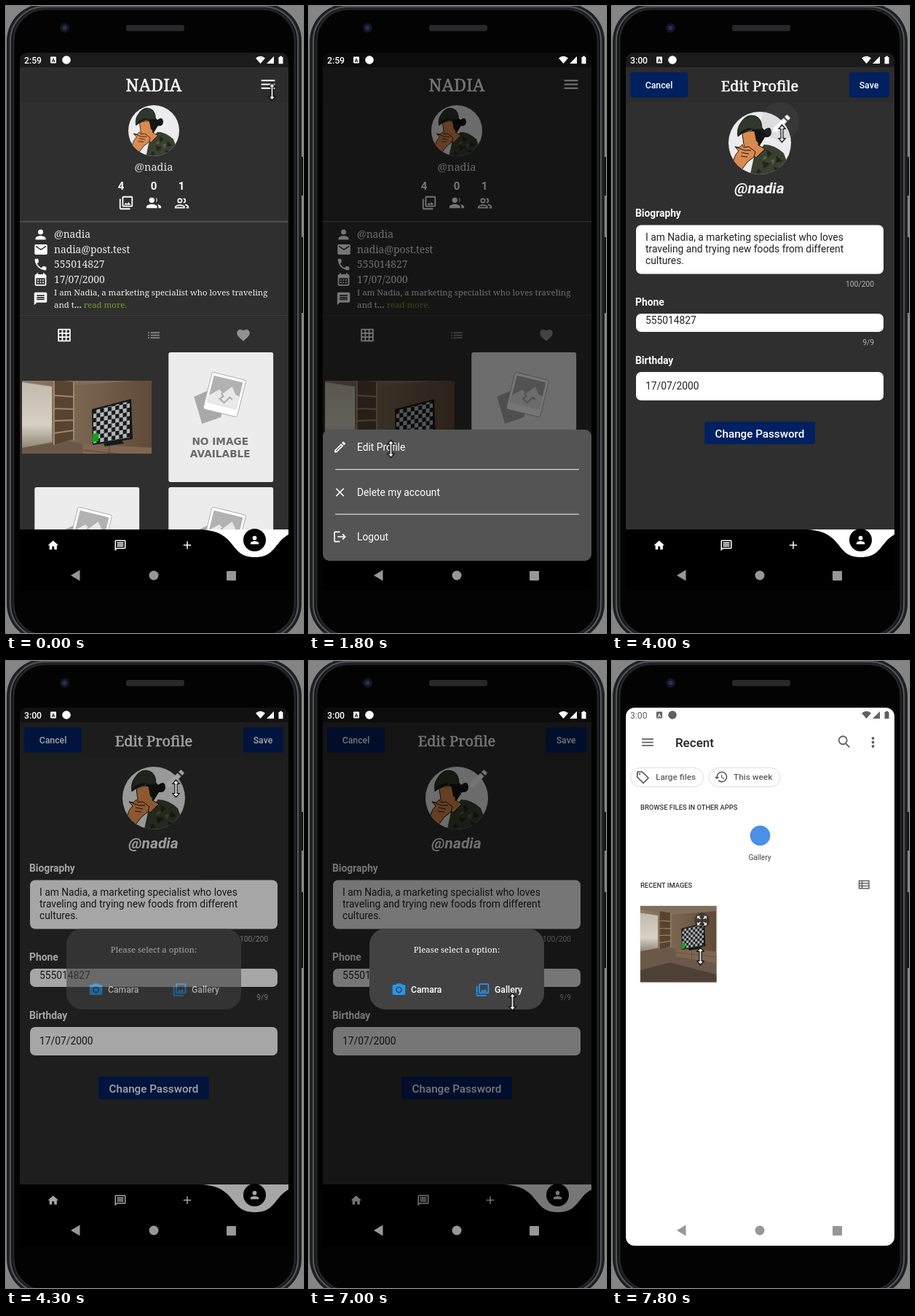
Write an HTML page that moves like this. It is 408 px wide and 860 px high and loops after 8000 ms.

```html
<!DOCTYPE html>
<html lang="en">
<head>
<meta charset="utf-8">
<title>Profile editing demo</title>
<style>
html, body { margin: 0; width: 100%; height: 100%; overflow: hidden; background: #858585; }
svg { display: block; }
#stage { width: 408px; height: 860px; }
text { font-family: Roboto, sans-serif; }
.serif { font-family: "Noto Serif", serif; }
.title { stroke: #fff; stroke-width: .5px; }
.stamp { font-family: "DejaVu Sans", sans-serif; }
.b { font-weight: 700; }
.m { font-weight: 500; }
.mid { text-anchor: middle; }
.end { text-anchor: end; }
.timed { animation: 8s step-end infinite; }

#edit, #late { animation-name: edit; }
@keyframes edit { 0% { opacity: 0 } 28.75%, 100% { opacity: 1 } }
#early { animation-name: early; }
@keyframes early { 0% { opacity: 1 } 28.75%, 100% { opacity: 0 } }
#scrim { animation-name: scrim; }
@keyframes scrim {
  0% { opacity: 0 } 3.75% { opacity: .4 } 6.25% { opacity: .54 }
  28.75% { opacity: 0 } 53.75% { opacity: .35 } 56.25%, 100% { opacity: .54 }
}
#sheet { animation-name: sheet; }
@keyframes sheet {
  0% { transform: translateY(190px) } 3.75% { transform: translateY(60px) }
  6.25% { transform: none } 28.75%, 100% { transform: translateY(190px) }
}
#glow { animation-name: glow; }
@keyframes glow { 0% { opacity: 0 } 43.75% { opacity: 1 } 53.75%, 100% { opacity: 0 } }
#dialog { animation-name: dialog; }
@keyframes dialog { 0% { opacity: 0 } 53.75% { opacity: .6 } 56.25%, 100% { opacity: 1 } }
#picker { animation-name: picker; }
@keyframes picker { 0% { opacity: 0 } 91.25%, 100% { opacity: 1 } }
#loaded { animation-name: loaded; }
@keyframes loaded { 0% { opacity: 0 } 97.5%, 100% { opacity: 1 } }
#cursor { animation-name: cursor; }
@keyframes cursor {
  0% { transform: translate(365.5px, 117.5px) }
  10% { transform: translate(268px, 344px) }
  12.5% { transform: translate(171px, 571px) }
  16.25% { transform: translate(110px, 604px) }
  18.75% { transform: translate(112.5px, 606px) }
  22.5% { transform: translate(112.5px, 607.5px) }
  35% { transform: translate(148px, 592px) }
  37.5% { transform: translate(184.5px, 577px) }
  41.25% { transform: translate(230px, 300px) }
  43.75% { transform: translate(233.5px, 178px) }
  50% { transform: translate(233.5px, 175px) }
  60% { transform: translate(256px, 330px) }
  62.5% { transform: translate(279.5px, 468px) }
  78.75% { transform: translate(279.5px, 467.5px) }
  97.5%, 100% { transform: translate(121.5px, 405px) }
}
</style>
</head>
<body>
<svg id="stage" viewBox="0 0 408 860">
<defs>
  <symbol id="menu" viewBox="0 0 24 24"><path d="M3 18h18v-2H3zm0-5h18v-2H3zm0-7v2h18V6z"/></symbol>
  <symbol id="person" viewBox="0 0 24 24"><circle cx="12" cy="8" r="4"/><path d="M12 14c-2.67 0-8 1.34-8 4v2h16v-2c0-2.66-5.33-4-8-4z"/></symbol>
  <symbol id="mail" viewBox="0 0 24 24"><path d="M20 4H4c-1.1 0-2 .9-2 2v12c0 1.1.9 2 2 2h16c1.1 0 2-.9 2-2V6c0-1.1-.9-2-2-2zm0 4l-8 5-8-5V6l8 5 8-5z"/></symbol>
  <symbol id="call" viewBox="0 0 24 24"><path d="M6.62 10.79c1.44 2.83 3.76 5.14 6.59 6.59l2.2-2.2c.27-.27.67-.36 1.02-.24 1.12.37 2.33.57 3.57.57.55 0 1 .45 1 1V20c0 .55-.45 1-1 1-9.39 0-17-7.61-17-17 0-.55.45-1 1-1h3.5c.55 0 1 .45 1 1 0 1.25.2 2.45.57 3.57.11.35.03.74-.25 1.02z"/></symbol>
  <symbol id="date" viewBox="0 0 24 24"><path d="M19 4h-1V2h-2v2H8V2H6v2H5c-1.1 0-2 .9-2 2v14c0 1.1.9 2 2 2h14c1.1 0 2-.9 2-2V6c0-1.1-.9-2-2-2zm0 16H5V10h14zM9 14H7v-2h2zm4 0h-2v-2h2zm4 0h-2v-2h2zm-8 4H7v-2h2zm4 0h-2v-2h2zm4 0h-2v-2h2z"/></symbol>
  <symbol id="note" viewBox="0 0 24 24"><path d="M20 2H4c-1.1 0-2 .9-2 2v18l4-4h14c1.1 0 2-.9 2-2V4c0-1.1-.9-2-2-2zm-2 12H6v-2h12zm0-3H6V9h12zm0-3H6V6h12z"/></symbol>
  <symbol id="chat" viewBox="0 0 24 24"><path d="M4 4h16v12H5.2L4 17.2zm0-2c-1.1 0-2 .9-2 2v18l4-4h14c1.1 0 2-.9 2-2V4c0-1.1-.9-2-2-2zm2 10h12v2H6zm0-3h12v2H6zm0-3h12v2H6z"/></symbol>
  <symbol id="grid" viewBox="0 0 24 24"><path d="M3 3h18v18H3zM9 3v18M15 3v18M3 9h18M3 15h18" fill="none" stroke="#fff" stroke-width="2" stroke-linejoin="round"/></symbol>
  <symbol id="list" viewBox="0 0 24 24"><path d="M3 13h2v-2H3zm0 4h2v-2H3zm0-8h2V7H3zm4 4h14v-2H7zm0 4h14v-2H7zM7 7v2h14V7z"/></symbol>
  <symbol id="heart" viewBox="0 0 24 24"><path d="M12 21.35l-1.45-1.32C5.4 15.36 2 12.28 2 8.5 2 5.42 4.42 3 7.5 3c1.74 0 3.41.81 4.5 2.09C13.09 3.81 14.76 3 16.5 3 19.58 3 22 5.42 22 8.5c0 3.78-3.4 6.86-8.55 11.54z"/></symbol>
  <symbol id="home" viewBox="0 0 24 24"><path d="M10 20v-6h4v6h5v-8h3L12 3 2 12h3v8z"/></symbol>
  <symbol id="add" viewBox="0 0 24 24"><path d="M19 13h-6v6h-2v-6H5v-2h6V5h2v6h6z"/></symbol>
  <symbol id="close" viewBox="0 0 24 24"><path d="M5.7 5.7l12.6 12.6M18.3 5.7L5.7 18.3" stroke="#fff" stroke-width="2"/></symbol>
  <symbol id="pencil" viewBox="0 0 24 24"><path d="M3 17.25V21h3.75L17.81 9.94l-3.75-3.75zM20.71 7.04c.39-.39.39-1.02 0-1.41l-2.34-2.34c-.39-.39-1.02-.39-1.41 0l-1.83 1.83 3.75 3.75z"/></symbol>
  <symbol id="pen" viewBox="0 0 24 24"><path d="M14.06 9.02l.92.92L5.92 19H5v-.92zM17.66 3c-.25 0-.51.1-.7.29l-1.83 1.83 3.75 3.75 1.83-1.83c.39-.39.39-1.02 0-1.41l-2.34-2.34c-.2-.2-.45-.29-.71-.29zm-3.6 3.19L3 17.25V21h3.75L17.81 9.94z" fill-rule="evenodd"/></symbol>
  <symbol id="exit" viewBox="0 0 24 24"><path d="M17 7l-1.41 1.41L18.17 11H8v2h10.17l-2.58 2.58L17 17l5-5zM4 5h8V3H4c-1.1 0-2 .9-2 2v14c0 1.1.9 2 2 2h8v-2H4z"/></symbol>
  <symbol id="album" viewBox="0 0 24 24"><path d="M20 4v12H8V4zm0-2H8c-1.1 0-2 .9-2 2v12c0 1.1.9 2 2 2h12c1.1 0 2-.9 2-2V4c0-1.1-.9-2-2-2zm-8.5 9.67l1.69 2.26 2.48-3.1L19 15H9zM2 6v14c0 1.1.9 2 2 2h14v-2H4V6z" fill-rule="evenodd"/></symbol>
  <symbol id="group" viewBox="0 0 24 24"><circle cx="9" cy="8" r="4"/><path d="M9 14c-2.7 0-8 1.3-8 4v2h16v-2c0-2.7-5.3-4-8-4zM14.5 4.2a4 4 0 0 1 0 7.6a6 6 0 0 0 0-7.6zM17 14.3c3 .6 6 1.8 6 3.7v2h-4v-2c0-1.6-.8-2.8-2-3.7z"/></symbol>
  <symbol id="group2" viewBox="0 0 24 24"><g fill="none" stroke="#fff" stroke-width="1.9"><circle cx="9" cy="8" r="3"/><path d="M2 19v-1c0-2 4.5-3 7-3s7 1 7 3v1zM14.5 5a3 3 0 0 1 0 6M17 14.5c2.5.5 5 1.5 5 3.5v1h-3"/></g></symbol>
  <symbol id="camera" viewBox="0 0 24 24"><path d="M9 2L7.17 4H4c-1.1 0-2 .9-2 2v12c0 1.1.9 2 2 2h16c1.1 0 2-.9 2-2V6c0-1.1-.9-2-2-2h-3.17L15 2zm3 15a5 5 0 1 1 0-10 5 5 0 0 1 0 10z"/><circle cx="12" cy="12" r="3.2"/></symbol>
  <symbol id="search" viewBox="0 0 24 24"><path d="M14 14l6 6M16 9.5a6 6 0 1 1-12 0 6 6 0 0 1 12 0z" fill="none" stroke="#616161" stroke-width="2"/></symbol>
  <symbol id="history" viewBox="0 0 24 24"><path d="M13 3a9 9 0 0 0-9 9H1l4 4 4-4H6a7 7 0 1 1 2.06 4.94l-1.42 1.42A9 9 0 1 0 13 3zm-1 5v5l4.28 2.54.72-1.21-3.5-2.08V8z"/></symbol>
  <symbol id="expand" viewBox="0 0 24 24"><path id="arm" d="M15 3l2.3 2.3-2.89 2.87 1.42 1.42L18.7 6.7 21 9V3z"/><use href="#arm" transform="rotate(90 12 12)"/><use href="#arm" transform="rotate(180 12 12)"/><use href="#arm" transform="rotate(270 12 12)"/></symbol>

  <g id="signals">
    <rect x="61" y="69.5" width="8" height="9" rx="1"/>
    <text x="65" y="77" class="mid b" font-size="7.5" style="fill:var(--bar)">A</text>
    <circle cx="83" cy="74" r="5.8"/>
    <path d="M343 71.5q6.5-5.5 13 0L349.5 79zM358 79h10V69zM374.5 70h1.5v-1.2h3V70h1.5v9.2h-6z"/>
  </g>

  <clipPath id="disc"><circle cx="43" cy="43" r="43"/></clipPath>
  <symbol id="avatar" viewBox="0 0 86 86">
    <g clip-path="url(#disc)">
      <path fill="#ececee" d="M0 0h86v86H0z"/>
      <path fill="#39402f" d="M29 90l6-28 14-17q14 0 27 12l12 33z"/>
      <path fill="#20251c" d="M52 52l8 5-6 6zM66 60l8 8-9 2zM46 68l11 3-8 7zM62 76l9 1-5 8zM40 78l6 4-8 4z"/>
      <path fill="#566147" d="M58 66l6-1-3 8zM50 60l3 4-7 2zM74 71l4 6-6-1z"/>
      <path fill="#151515" d="M32 20q14-1 17 5 9-7 10 3 0 8-9 7l-8 13-9-4z"/>
      <path fill="#d98a50" stroke="#24150e" d="M19 30q9-5 19-3l4 8-1 11 9 5-12 12-13-10-4-8z"/>
      <path fill="#151515" d="M35 25l7-1 1 21-5-5z"/>
      <path fill="#30372b" stroke="#161a12" d="M13 34q-2-11 4-19 8-13 20-9 9 3 9 18-8 0-15 1-9 1-18 9z"/>
      <path fill="#171b14" d="M13 34q2-9 16-12l5 2q-12 2-21 10z"/>
      <path fill="#d98a50" stroke="#24150e" d="M6 73q1-13 8-19l-5-6 6 1 4-4 2 4 7-1 9 7-2 7-9 7-9 12z"/>
      <path fill="none" stroke="#24150e" d="M9 48l13 5 9 0M18 56l10 2M17 61l9 1"/>
    </g>
  </symbol>

  <pattern id="checks" width="10.4" height="11.6" patternUnits="userSpaceOnUse" patternTransform="translate(97 41) skewY(-10)">
    <path fill="#b3b7b8" d="M0 0h10.4v11.6H0z"/><path fill="#17191b" d="M0 0h5.2v5.8H0zM5.2 5.8h5.2v5.8H5.2z"/>
  </pattern>
  <linearGradient id="wall"><stop offset="0" stop-color="#8d7c69"/><stop offset=".45" stop-color="#79654f"/><stop offset="1" stop-color="#5f4a37"/></linearGradient>
  <linearGradient id="pane" x2="0" y2="1"><stop offset="0" stop-color="#c3baac"/><stop offset=".65" stop-color="#d6d1c6"/><stop offset="1" stop-color="#8f8577"/></linearGradient>
  <symbol id="room" viewBox="0 0 178 178">
    <path fill="url(#wall)" d="M0 0h178v178H0z"/>
    <path fill="#7f6e5b" d="M0 0h178v12L75 20 0 8z"/>
    <path fill="url(#pane)" d="M0 16l41 6v76L0 106z"/>
    <path fill="#6a5949" d="M0 106l60-10 118 22v60H0z"/>
    <path fill="#4e4035" d="M0 150l70-18 108 28v18H0z"/>
    <path fill="#564330" d="M43 12l28 4v78l-28 8z"/>
    <path fill="none" stroke="#9f876b" stroke-width="2" d="M44 12v90M71 16v80M44 34l27 2M44 52l27 1M44 69l27-1M44 86l27-4"/>
    <path fill="#7d6751" d="M83 100l95 6v27l-95-15z"/>
    <path stroke="#4e3e2a" stroke-width=".8" d="M83 109l95 10M120 103v20"/>
    <g transform="translate(0 13)">
      <path fill="#171717" d="M96 40l54-14 2 55-55 8z"/>
      <path fill="url(#checks)" d="M98 42l50-13v50l-50 8z"/>
      <path fill="#00a714" d="M97 74l8-1v11l-8 1z"/>
      <path fill="#171717" d="M112 87l25-5 3 5-26 4z"/>
    </g>
  </symbol>

  <symbol id="blank" viewBox="0 0 144 178">
    <rect width="144" height="178" rx="3" fill="#ececec"/>
    <path fill="#a9a9a9" d="M35 61l18-8 5 26 15 5-1 5-26 9z"/>
    <g transform="rotate(14 77 58)">
      <rect x="53" y="32" width="48" height="52" rx="3" fill="#fff" stroke="#b0b0b0"/>
      <rect x="56.5" y="36" width="41" height="38" fill="#b2b2b2"/>
      <path fill="#e9e9e9" d="M56.5 64l12-11 6 4 10-12 7 9 6 2v18h-41z"/>
      <path fill="none" stroke="#aaa" stroke-width="2" d="M72 57l4 4-4 4 7 4 6-9 4 2"/>
    </g>
    <g fill="#6a6a6a" font-size="13.7"><text x="71" y="127" class="stamp b mid">NO IMAGE</text><text x="71" y="144" class="stamp b mid">AVAILABLE</text></g>
  </symbol>
  <clipPath id="page"><path d="M19 64h369v654H19z"/></clipPath>
  <clipPath id="app"><path d="M19 64h369v697H19z"/></clipPath>
  <clipPath id="post"><path d="M22 514h178v100H22z"/></clipPath>
</defs>

<!-- phone -->
<path fill="#858585" d="M0 0h408v860H0z"/>
<path fill="#111" d="M405 207h3v53h-3zM405 317h3v104h-3z"/>
<rect x="1" y="-3" width="405" height="874" rx="51" fill="#1d1e20"/>
<rect x="6" y="1" width="395" height="866" rx="47" fill="#050505" stroke="#505256" stroke-width="2.5"/>
<rect x="10" y="4" width="387" height="860" rx="44" fill="#030303" stroke="#232427" stroke-width="3"/>
<rect x="165" y="26" width="80" height="8.5" rx="3" fill="#28282a"/>
<circle cx="80.5" cy="30" r="6.5" fill="#14161f"/><circle cx="80.5" cy="30" r="3" fill="#25305e"/>
<path d="M19 802V76q0-12 12-12h345q12 0 12 12v726z"/>

<g clip-path="url(#page)">
  <path fill="#1b1b1b" d="M19 84V76q0-12 12-12h345q12 0 12 12v8z"/>
  <path fill="#2f2f2f" d="M19 84h369v634H19z"/>
  <path fill="#2c2c2c" d="M19 84h369v48H19z"/>

  <g id="profile" fill="#fff">
    <text x="203" y="117" class="serif title mid m" font-size="23.5">NADIA</text>
    <use href="#menu" x="347.5" y="95" width="25" height="25"/>
    <use href="#avatar" x="168" y="136" width="70" height="70"/>
    <text x="203" y="226" class="serif mid" font-size="14.6" fill="#e4e4e4">@nadia</text>
    <g class="mid b" font-size="15"><text x="158" y="252">4</text><text x="203" y="252">0</text><text x="241" y="252">1</text></g>
    <use href="#album" x="154" y="259" width="22" height="22"/>
    <use href="#group" x="192" y="259" width="22" height="22"/>
    <use href="#group2" x="231" y="260" width="21" height="21"/>
    <path fill="#5a5a5a" d="M19 295h369v1.5H19z"/>
    <use href="#person" x="37" y="303" width="21" height="21"/>
    <use href="#mail" x="37.5" y="323.5" width="21" height="21"/>
    <use href="#call" x="37" y="344" width="21" height="21"/>
    <use href="#date" x="37" y="364.5" width="21" height="21"/>
    <use href="#note" x="37" y="391" width="21" height="21"/>
    <g font-size="13.8" fill="#eee">
      <text x="66" y="318" class="serif">@nadia</text><text x="66" y="339" class="serif">nadia@post.test</text>
      <text x="66" y="359" class="serif">555014827</text><text x="66" y="380" class="serif">17/07/2000</text>
    </g>
    <g font-size="11.4" fill="#eee">
      <text x="66" y="397" class="serif">I am Nadia, a marketing specialist who loves traveling</text>
      <text x="66" y="414" class="serif">and t<tspan class="b">... </tspan><tspan fill="#7e9a2b">read more.</tspan></text>
    </g>
    <path fill="#3b3b3b" d="M19 424h369v1H19z"/>
    <use href="#grid" x="69.5" y="441" width="21" height="21"/>
    <use href="#list" x="192.5" y="441" width="21" height="21" fill="#888"/>
    <use href="#heart" x="315.5" y="441" width="21" height="21" fill="#929292"/>
    <g clip-path="url(#post)"><use href="#room" x="22" y="500" width="178" height="178"/></g>
    <use href="#blank" x="223" y="475" width="144.5" height="178"/>
    <use href="#blank" x="39" y="660" width="144.5" height="178"/>
    <use href="#blank" x="223" y="660" width="144.5" height="178"/>
  </g>

  <g id="edit" class="timed" fill="#fff">
    <path fill="#2f2f2f" d="M19 84h369v634H19z"/>
    <path fill="#2c2c2c" d="M19 84h369v48H19z"/>
    <g fill="#00205f"><rect x="25" y="91" width="79" height="34.5" rx="3"/><rect x="326" y="91" width="55" height="34.5" rx="3"/><rect x="127" y="570" width="152" height="31" rx="3"/></g>
    <g class="mid m"><text x="64.5" y="113" font-size="12.3">Cancel</text><text x="353" y="113" font-size="12.3">Save</text><text x="203" y="592" font-size="15.2">Change Password</text></g>
    <text x="203" y="117" class="serif title mid m" font-size="20">Edit Profile</text>
    <use href="#avatar" x="160" y="145" width="86" height="86"/>
    <circle id="glow" class="timed" cx="231" cy="158" r="26" fill="#777" fill-opacity=".12"/>
    <use href="#pencil" x="217.5" y="145.5" width="31" height="31"/>
    <text x="202.500" y="257" class="mid b" font-size="21" font-style="italic" fill="#f2f2f2">@nadia</text>
    <g class="b" font-size="13.8"><text x="32" y="289">Biography</text><text x="32" y="411">Phone</text><text x="32" y="491">Birthday</text></g>
    <rect x="33" y="300.5" width="340" height="67" rx="7"/><rect x="33" y="422" width="340" height="25" rx="7"/><rect x="33" y="502" width="340" height="39" rx="7"/>
    <g fill="#222" font-size="13.8">
      <text x="46" y="322">I am Nadia, a marketing specialist who loves</text><text x="46" y="338">traveling and trying new foods from different</text><text x="46" y="354">cultures.</text>
      <text x="46" y="436">555014827</text><text x="46" y="525.5">17/07/2000</text>
    </g>
    <g class="end" fill="#b4b4b4" font-size="10.3"><text x="360" y="385">100/200</text><text x="360" y="464.5">9/9</text></g>
  </g>
</g>

<!-- tab bar -->
<g fill="#fff" clip-path="url(#app)">
  <path d="M268 718C319.7 721 305 756 342 756S364 721 415.700 718z"/>
  <circle cx="341.5" cy="732.5" r="15.5" fill="#000"/>
  <use href="#person" x="333" y="724" width="17" height="17"/>
  <use href="#home" x="56" y="731" width="17.5" height="17.5"/>
  <use href="#chat" x="148" y="731" width="18" height="18"/>
  <use href="#add" x="240" y="730.5" width="18" height="18"/>
</g>

<g clip-path="url(#app)">
  <path id="scrim" class="timed" d="M19 761V76q0-12 12-12h345q12 0 12 12v685z"/>
  <g id="sheet" class="timed" fill="#fff">
    <rect x="19" y="581" width="369" height="180" rx="9" fill="#545454"/>
    <path fill="#d8d8d8" d="M36 635h335v1.3H36zM36 696.5h335v1.3H36z"/>
    <use href="#pen" x="32.5" y="595" width="20" height="20"/><use href="#close" x="32.5" y="657" width="20" height="20"/><use href="#exit" x="32.5" y="718" width="20" height="20"/>
    <g font-size="13.8"><text x="66" y="610">Edit Profile</text><text x="66" y="671.5">Delete my account</text><text x="66" y="733">Logout</text></g>
  </g>
</g>

<g fill="#fff" style="--bar:#1b1b1b">
  <g class="m" font-size="12.2"><text id="early" class="timed" x="25" y="78.5">2:59</text><text id="late" class="timed" x="25" y="78.5">3:00</text></g>
  <use href="#signals"/>
</g>

<g id="dialog" class="timed" fill="#fff">
  <rect x="83" y="367" width="240" height="111" rx="22" fill="#424242"/>
  <text x="203" y="400" class="serif mid" font-size="11.4">Please select a option:</text>
  <g fill="#2196f3"><use href="#camera" x="113" y="440.5" width="21" height="21"/><use href="#album" x="228" y="440.5" width="21" height="21"/></g>
  <g class="m" font-size="12.2"><text x="140" y="455">Camara</text><text x="255" y="455">Gallery</text></g>
</g>

<g id="picker" class="timed" fill="#616161">
  <rect x="19" y="64" width="369" height="738" rx="12" fill="#fff"/>
  <text x="25" y="78.5" font-size="12.2">3:00</text>
  <use href="#signals" style="--bar:#fff"/>
  <use href="#menu" x="38.5" y="101" width="21" height="21"/>
  <text x="87" y="118" class="m" font-size="17" fill="#222">Recent</text>
  <use href="#search" x="308" y="100" width="22" height="22"/>
  <circle cx="358.5" cy="106" r="1.9"/><circle cx="358.5" cy="111.5" r="1.9"/><circle cx="358.5" cy="117" r="1.9"/>
  <g fill="none" stroke="#dadce0"><rect x="25.5" y="146.5" width="100" height="26" rx="13"/><rect x="133" y="146.5" width="98" height="26" rx="13"/></g>
  <path fill="none" stroke="#555" stroke-width="1.7" stroke-linejoin="round" d="M35 152h6.5l8.5 8.5-7 7-8.5-8.5z"/><circle cx="38" cy="155" r="1.2"/>
  <use href="#history" x="140" y="149" width="20" height="20"/>
  <g class="m" font-size="11.8"><text x="60" y="163.3">Large files</text><text x="167" y="163.3">This week</text></g>
  <g class="m" font-size="9.4" fill="#333"><text x="39" y="204">BROWSE FILES IN OTHER APPS</text><text x="39" y="310.5">RECENT IMAGES</text></g>
  <text x="203" y="273" class="mid" font-size="10.2" fill="#444">Gallery</text>
  <path fill="none" stroke="#616161" stroke-width="1.5" d="M339.5 301.5h13.5v10.5h-13.5zM343.5 301.5v10.5M339.5 305h13.5M339.5 308.5h13.5"/>
  <g id="loaded" class="timed">
    <circle cx="203.5" cy="239.5" r="13.8" fill="#4a8fe8"/>
    <rect x="38.5" y="335.5" width="106" height="106" fill="#d6d6d6"/>
    <use href="#room" x="39" y="336" width="104.5" height="104.5"/>
    <circle cx="123.5" cy="356" r="10.5" fill="#222" fill-opacity=".55"/>
    <use href="#expand" x="115" y="347.5" width="17" height="17" fill="#fff"/>
  </g>
</g>

<g fill="#979797"><path d="M89 781l12.5-7.5v15z"/><circle cx="203" cy="781" r="6.5"/><rect x="303" y="775" width="13" height="13" rx="1"/></g>
<g id="cursor" class="timed"><path fill="#fff" stroke="#000" stroke-width="1.2" d="M0-12l4.5 5.5H1.5v13H4.5L0 12l-4.5-5.5H-1.5v-13H-4.5z"/></g>
</svg>
</body>
</html>
```
